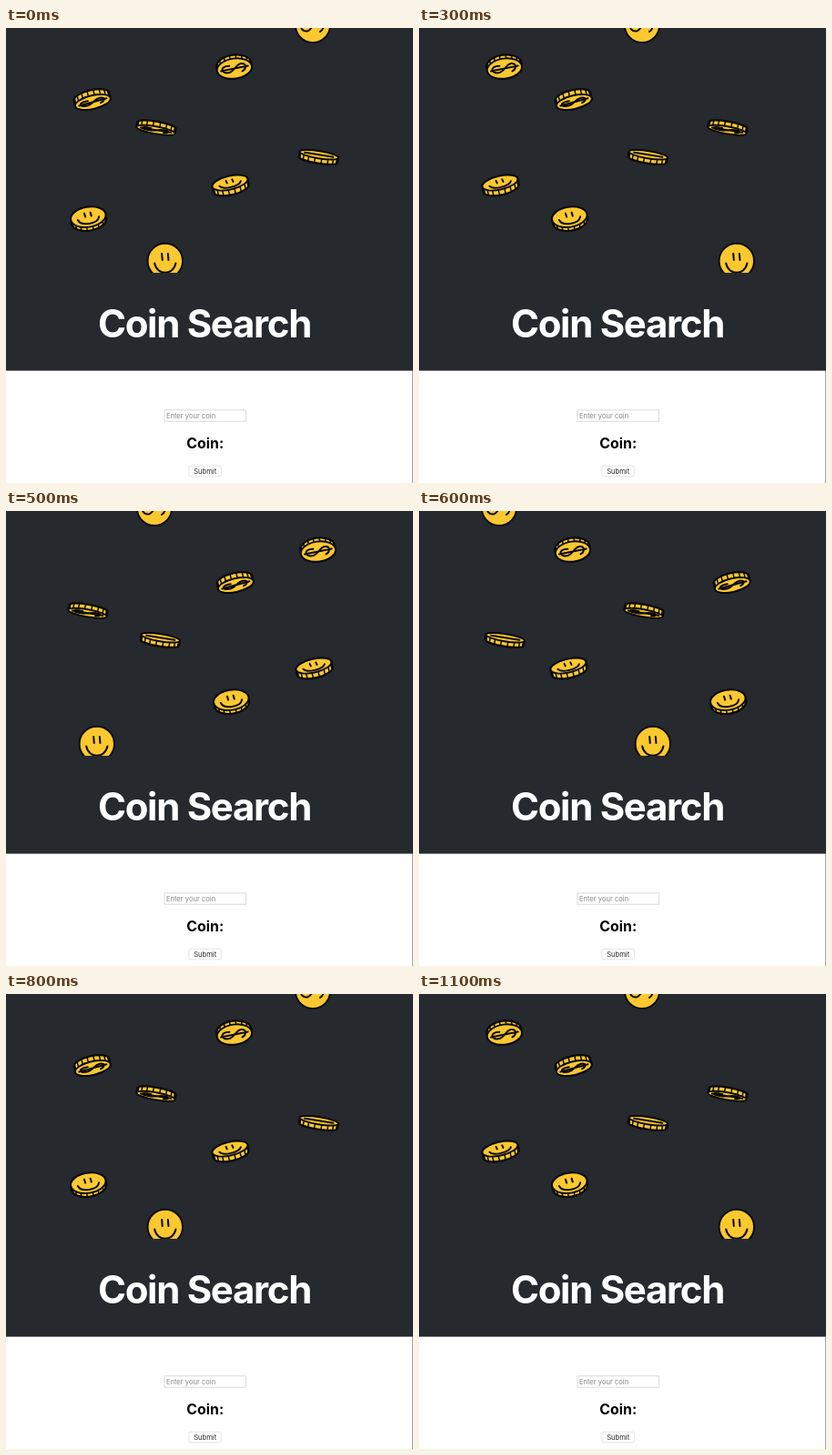
Animation of 447x500 px, one loop 1.2 s. Source, as an HTML page with a canvas:

```html
<!DOCTYPE html>
<html lang="en">
<head>
<meta charset="utf-8">
<title>Coin Search</title>
<style>
  html, body { margin: 0; width: 100%; height: 100%; overflow: hidden; background: #fff; }
  svg, canvas { position: absolute; left: 0; top: 0; display: block; }
  text { font-family: Inter, "Liberation Sans", sans-serif; text-anchor: middle; }
</style>
</head>
<body>
<svg width="447" height="500">
  <rect x="446" width="1" height="500" fill="#a4a5a8"/>
  <rect width="447" height="376.6" fill="#26292e"/>
  <text x="218" y="340" font-size="42" font-weight="700" letter-spacing="-.031em" fill="#fff">Coin Search</text>
  <rect x="174" y="419.8" width="89.6" height="12.4" fill="#fff" stroke="#d8d8d8" stroke-width=".9"/>
  <text x="175.9" y="429" font-size="7.6" fill="#8a8a8a" style="text-anchor:start">Enter your coin</text>
  <text x="218.8" y="462" font-size="15.9" font-weight="700" fill="#000">Coin:</text>
  <rect x="200.8" y="481.2" width="35.6" height="11.6" rx="2.2" fill="#fff" stroke="#dedede" stroke-width=".8"/>
  <text x="218.7" y="489.8" font-size="7.6" fill="#2a2a2a">Submit</text>
</svg>
<canvas id="stage" width="447" height="269"></canvas>
<script>
const ctx = document.getElementById('stage').getContext('2d');
const GOLD = '#fbc830', INK = '#0b0a08', STEP = 100;

// Face drawings on a disc of radius 19
const SMILE = new Path2D('M-3.6 -8L-3 -1M3 -8L3.6 -1M-11.5 2.5C-9 16 9 16 11.5 2.5');
const DOLLAR = new Path2D('M-15 1.5L15 -1.5M-5 -6C-16 -9 -16 8 -6 6.5C0 5 2 -7.5 8 -7.5C14 -7.5 13 4 8 7');
const EDGE = new Path2D('M-14 0H14');

// Poses from top to bottom; a negative depth shows the rim above the face
const poses = [
  { dx: 0,   y: -3,    rx: 19,   ry: 19,   depth: 0,    tilt: 0,   art: DOLLAR },
  { dx: 5.6, y: 42.5,  rx: 19.2, ry: 11,   depth: -4,   tilt: -8,  art: DOLLAR },
  { dx: 6.7, y: 78.5,  rx: 19.8, ry: 7.4,  depth: -6,   tilt: -13, art: DOLLAR },
  { dx: 2,   y: 109.5, rx: 21.4, ry: 4,    depth: -5.5, tilt: 10,  art: DOLLAR },
  { dx: 6.3, y: 142,   rx: 21.4, ry: 4,    depth: 5.5,  tilt: 9,   art: EDGE },
  { dx: 1.6, y: 173,   rx: 19.9, ry: 7.4,  depth: 6,    tilt: -13, art: SMILE },
  { dx: 2.6, y: 209.7, rx: 19.4, ry: 11,   depth: 4,    tilt: -9,  art: SMILE },
  { dx: 11.8, y: 256,  rx: 19.2, ry: 19.2, depth: 0,    tilt: 0,   art: SMILE }
];
const columns = [
  { x: 88, phase: 2 }, { x: 163, phase: 3 }, { x: 245, phase: 1 }, { x: 337, phase: 0 }
];

function paint(path, width) {
  ctx.lineWidth = width;
  ctx.fill(path);
  ctx.stroke(path);
}

function drawCoin(colX, { dx, y, rx, ry, depth, tilt, art }) {
  const half = Math.abs(depth) / 2, faceY = -depth / 2;
  ctx.save();
  ctx.translate(colX + dx, y);
  ctx.rotate(tilt * Math.PI / 180);

  if (depth) {
    const rim = new Path2D();
    rim.ellipse(0, half, rx, ry, 0, 0, Math.PI);
    rim.ellipse(0, -half, rx, ry, 0, Math.PI, 2 * Math.PI);
    rim.closePath();
    paint(rim, 2.2);
    const ticks = new Path2D();
    for (let i = 1; i < 9; i++) {
      const a = i * Math.PI / 9;
      const tx = rx * Math.cos(a), ty = faceY + Math.sign(depth) * ry * Math.sin(a);
      ticks.moveTo(tx, ty);
      ticks.lineTo(tx, ty + depth);
    }
    ctx.lineWidth = 1.5;
    ctx.stroke(ticks);
  }

  const face = new Path2D();
  face.ellipse(0, faceY, rx, ry, 0, 0, 2 * Math.PI);
  paint(face, 1.9);

  // Squash the drawing onto the face but keep an even line weight
  const drawing = new Path2D();
  drawing.addPath(art, new DOMMatrix([rx / 19, 0, 0, ry / 19, 0, faceY]));
  ctx.lineWidth = 2;
  ctx.stroke(drawing);
  ctx.restore();
}

function draw(now) {
  const step = Math.floor(now / STEP) % 4;
  ctx.clearRect(0, 0, 447, 269);
  ctx.fillStyle = GOLD;
  ctx.strokeStyle = INK;
  ctx.lineCap = ctx.lineJoin = 'round';
  for (const { x, phase } of columns) {
    const k = (step + phase) % 4;
    drawCoin(x, poses[k]);
    drawCoin(x, poses[k + 4]);
  }
}

const start = performance.now();
function tick() {
  draw(performance.now() - start);
  requestAnimationFrame(tick);
}
tick();
</script>
</body>
</html>
```
